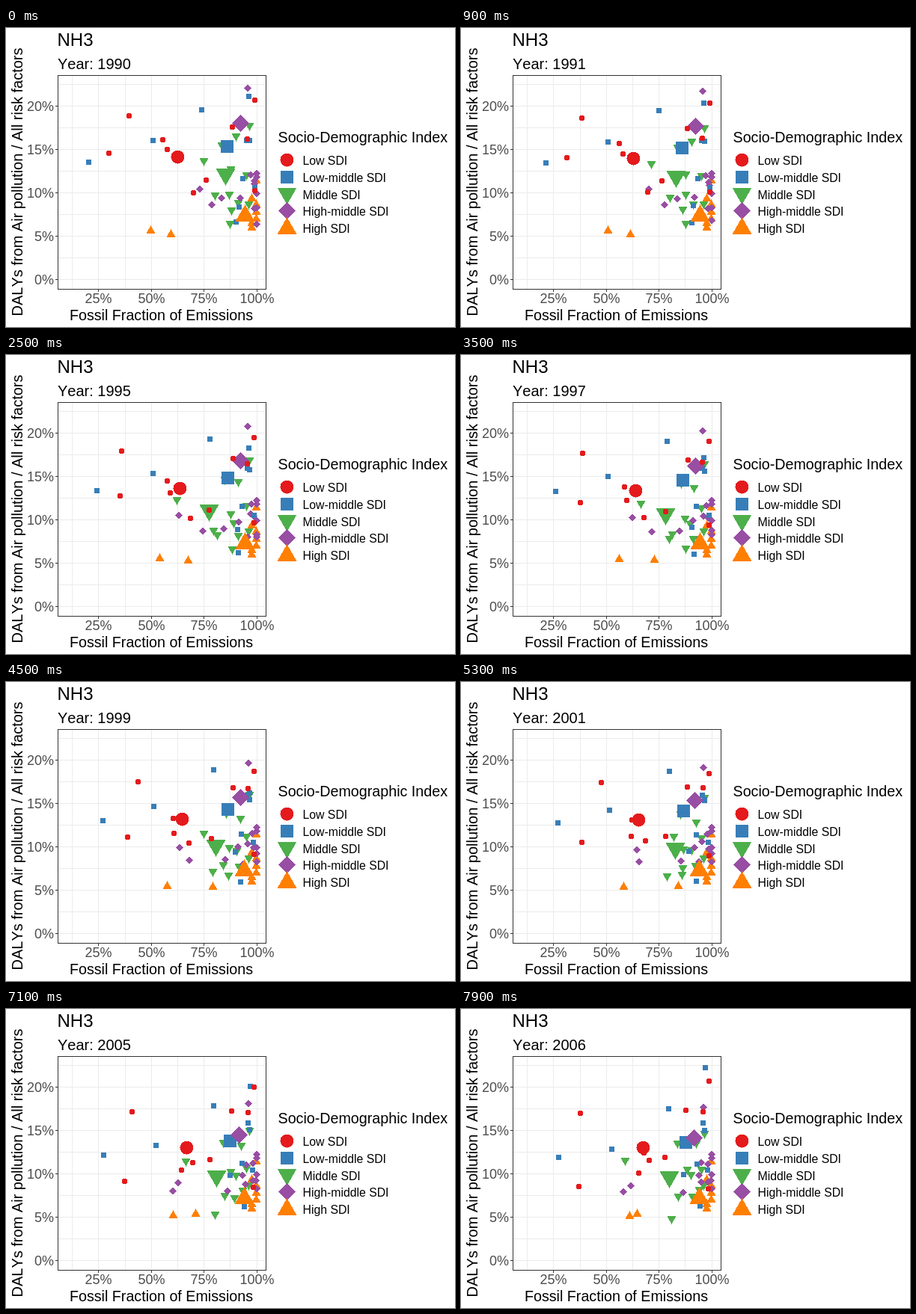
An HTML page for the animation above (8 s loop, 600 px wide and 400 px high).

```html
<!DOCTYPE html>
<html lang="en">
<head>
<meta charset="utf-8">
<title>NH3</title>
<style>
html, body { margin: 0; width: 100%; height: 100%; overflow: hidden; background: #fff; }
svg { display: block; width: 100vw; height: 100vh; }
text { font-family: "Liberation Sans", Arial, sans-serif; font-kerning: none; fill: #000; }
.axis { font-size: 18px; fill: #4d4d4d; }
.name { font-size: 19.7px; }
.key { font-size: 15.8px; }
</style>
</head>
<body>
<svg id="stage" viewBox="0 0 600 400">
  <text x="68.5" y="24" font-size="24">NH3</text>
  <text id="year" x="69" y="55" font-size="20">Year: 1990</text>
  <g id="grid" shape-rendering="crispEdges"></g>
  <g id="dots" shape-rendering="crispEdges"></g>
  <rect x="69.5" y="63.5" width="278" height="286" fill="none" stroke="#333" shape-rendering="crispEdges"/>
  <text class="name" x="207.5" y="391" text-anchor="middle">Fossil Fraction of Emissions</text>
  <text font-size="20" text-anchor="middle" transform="translate(22 206) rotate(-90)">DALYs from Air pollution / All risk factors</text>
  <text class="name" x="363.5" y="153">Socio-Demographic Index</text>
  <g id="legend" shape-rendering="crispEdges"></g>
</svg>
<script>
const $ = id => document.getElementById(id);

function add(parent, tag, attrs, label) {
  const el = document.createElementNS(parent.namespaceURI, tag);
  for (const k in attrs) el.setAttribute(k, attrs[k]);
  if (label) el.textContent = label;
  parent.appendChild(el);
  return el;
}

// Paths centred on their bounding boxes
const poly = (...p) => 'M' + p.join('L') + 'Z';
const circle = r => `M${-r} 0a${r} ${r} 0 1 0 ${2 * r} 0a${r} ${r} 0 1 0 ${-2 * r} 0Z`;
const square = a => poly([-a, -a], [a, -a], [a, a], [-a, a]);
const diamond = a => poly([0, -a], [a, 0], [0, a], [-a, 0]);
const up = a => poly([-a, a * .87], [a, a * .87], [0, -a * .87]);
const down = a => poly([-a, -a * .87], [a, -a * .87], [0, a * .87]);

const kind = (color, shape, small, big) => ({ color, small: shape(small), big: shape(big) });
const LOW = kind('#e41a1c', circle, 3.6, 9);
const LOWMID = kind('#377eb8', square, 3.6, 8.4);
const MID = kind('#4daf4a', down, 6, 13);
const HIGHMID = kind('#984ea3', diamond, 5, 11.6);
const HIGH = kind('#ff7f00', up, 6, 13);

const grid = $('grid');
const line = (d, stroke) => add(grid, 'path', { d, stroke, fill: 'none' });
const colX = pct => Math.round(52.95 + pct * 2.816) + .5;
const rowY = pct => Math.round(336 - pct * 11.6) + .5;
for (let p = 12.5; p <= 100; p += 12.5) line(`M${colX(p)} 64V349`, '#ebebeb');
for (let p = 0; p <= 22.5; p += 2.5) line(`M70 ${rowY(p)}H347`, '#ebebeb');
for (let p = 25; p <= 100; p += 25) {
  line(`M${colX(p)} 350V353`, '#333');
  add(grid, 'text', { class: 'axis', x: colX(p), y: 368, 'text-anchor': 'middle' }, p + '%');
}
for (let p = 0; p <= 20; p += 5) {
  line(`M66 ${rowY(p)}H69`, '#333');
  add(grid, 'text', { class: 'axis', x: 64, y: rowY(p) + 6.5, 'text-anchor': 'end' }, p + '%');
}

[[LOW, 'Low SDI', 176.5], [LOWMID, 'Low-middle SDI', 199.5], [MID, 'Middle SDI', 225],
 [HIGHMID, 'High-middle SDI', 244.5], [HIGH, 'High SDI', 264.5]].forEach(([k, label, y], i) => {
  add($('legend'), 'path', { d: k.big, fill: k.color, transform: `translate(375.5 ${y})` });
  add($('legend'), 'text', { class: 'key', x: 396.5, y: 183 + i * 22.75 }, label);
});

// A dot moves straight between key points spread evenly over the loop
const LAST = 38;
const dots = [];

function mark(size, k, path) {
  dots.push({ path, el: add($('dots'), 'path', { d: k[size], fill: k.color }) });
}
const dot = (k, ...path) => mark('small', k, path);
const mean = (k, ...path) => mark('big', k, path);
const column = (k, x, ...ys) => ys.forEach(y => dot(k, [x, y]));

function place({ el, path }, step) {
  const pos = step / LAST * (path.length - 1);
  const i = Math.floor(pos);
  const from = path[i], to = path[i + 1] || from;
  const [x, y] = from.map((v, j) => Math.round(v + (to[j] - v) * (pos - i)));
  el.setAttribute('transform', `translate(${x + .5} ${y - .5})`);
}

dot(HIGH, [193, 270], [214, 272], [225, 276]);
dot(HIGH, [220, 275], [246, 274], [291, 272], [235, 273]);
column(HIGH, 334, 203, 235, 245, 254);
column(HIGH, 328, 227, 260, 266);

dot(MID, [264, 180], [223, 198], [286, 209], [219, 205]);
dot(MID, [288, 159], [295, 177], [289, 182]);
dot(MID, [307, 147], [310, 176], [314, 190], [314, 182]);
dot(MID, [325, 133], [325, 169]);
dot(MID, [300, 191], [300, 219], [297, 226], [302, 217]);
dot(MID, [279, 226], [277, 239], [296, 251], [290, 253]);
dot(MID, [301, 246], [279, 243], [275, 263], [281, 283]);
dot(MID, [299, 264], [302, 262], [295, 260], [309, 253]);
dot(MID, [298, 225], [308, 228], [307, 224]);
dot(MID, [310, 236], [310, 250], [318, 244]);
dot(MID, [321, 199], [321, 217]);
dot(MID, [324, 238]);

dot(HIGHMID, [322, 81], [323, 132]);
dot(HIGHMID, [258, 216], [226, 215], [234, 225], [226, 237]);
dot(HIGHMID, [274, 237], [260, 236], [236, 241], [216, 245]);
dot(HIGHMID, [287, 228], [296, 246]);
dot(HIGHMID, [312, 228], [308, 221], [317, 223]);
dot(HIGHMID, [326, 197], [329, 208]);
dot(HIGHMID, [331, 205], [322, 218], [320, 206]);
dot(HIGHMID, [331, 242], [316, 245], [320, 232]);
dot(HIGHMID, [331, 209], [329, 232]);
dot(HIGHMID, [334, 263], [334, 230], [333, 230]);
column(HIGHMID, 334, 195, 200, 222, 241);

dot(LOWMID, [110, 180], [129, 184], [130, 199]);
dot(LOWMID, [196, 151], [196, 165], [201, 188]);
dot(LOWMID, [261, 110], [274, 114], [278, 120], [277, 134]);
dot(LOWMID, [324, 92], [324, 130], [325, 159], [326, 79]);
dot(LOWMID, [321, 151], [323, 153]);
dot(LOWMID, [325, 151], [325, 163]);
dot(LOWMID, [316, 202], [314, 203], [315, 208]);
dot(LOWMID, [311, 240], [307, 229], [297, 222]);
dot(LOWMID, [307, 260], [312, 268], [319, 264]);
dot(LOWMID, [332, 214], [329, 216]);

mean(MID, [293, 200], [268, 214], [286, 227], [278, 229]);
mean(LOWMID, [295, 159], [296, 170], [300, 179]);
mean(HIGHMID, [313, 128], [313, 153], [311, 173]);
mean(HIGH, [319, 248], [318, 250]);

dot(LOW, [164, 118], [153, 131], [188, 135], [159, 140]);
dot(LOW, [137, 168], [163, 204], [157, 238]);
dot(LOW, [209, 150], [220, 182], [244, 193]);
dot(LOW, [215, 163], [222, 201], [237, 220]);
dot(LOW, [250, 221], [243, 217], [251, 203]);
dot(LOW, [267, 204], [274, 211], [272, 199]);
dot(LOW, [302, 133], [303, 143], [300, 136]);
dot(LOW, [322, 149], [323, 138]);
dot(LOW, [332, 97], [331, 113], [331, 123], [331, 97]);
dot(LOW, [332, 218], [330, 241]);
mean(LOW, [229, 173], [234, 184], [243, 186]);

function draw(now) {
  const t = now % 8000;
  const step = t < 500 ? 0 : 1 + Math.floor((t - 500) / 200);
  $('year').textContent = 'Year: ' + Math.round(1990 + step * 3 / 7);
  for (const d of dots) place(d, step);
}

function tick() {
  draw(performance.now());
  requestAnimationFrame(tick);
}
tick();
</script>
</body>
</html>
```
